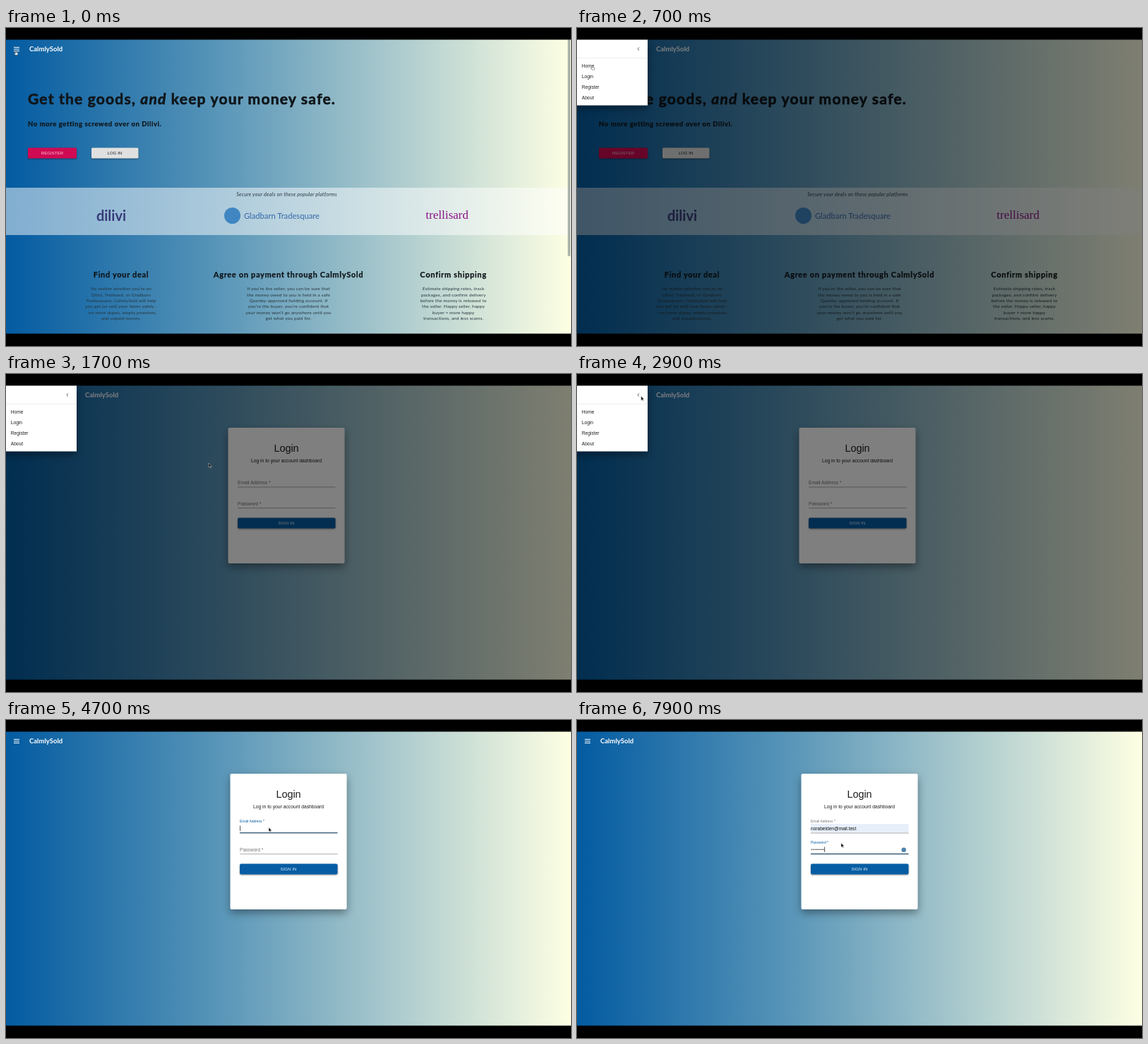
Recreate the animation shown at these times as an HTML page. Size 800 px wide and 450 px high, loop 8000 ms.

```html
<!DOCTYPE html>
<html lang="en">
<head>
<meta charset="utf-8">
<title>Sign-in walkthrough</title>
<style>
  html, body { margin: 0; width: 100%; height: 100%; overflow: hidden; background: #000; }
  svg { display: block; width: 800px; height: 450px; font-family: "Liberation Sans", Arial, sans-serif; }
  .geo { font-family: Lato, sans-serif; }
  .mid { text-anchor: middle; }
  .h1, .h2, .h3 { font-weight: 700; stroke: #10161a; stroke-width: .25px; }
  .h1 { font-size: 21px; letter-spacing: 1.2px; stroke-width: .6px; }
  .h2 { font-size: 9.5px; letter-spacing: .58px; }
  .h3 { font-size: 11px; letter-spacing: .68px; }
  .para { font-size: 6.45px; letter-spacing: .17px; fill: #26353c; }
  .btn { font-size: 6px; letter-spacing: .1px; }
  .field { font-size: 6.6px; }
  .lift { filter: drop-shadow(0 1px 1px rgba(0,0,0,.4)); }
  .card { filter: drop-shadow(0 5px 6px rgba(0,0,0,.38)); }
  .panel { filter: drop-shadow(0 4px 6px rgba(0,0,0,.4)); }
</style>
</head>
<body>
<svg viewBox="0 0 800 450">
  <defs>
    <linearGradient id="sky">
      <stop offset="0" stop-color="#035ba1"/>
      <stop offset=".375" stop-color="#5895b8"/>
      <stop offset="1" stop-color="#feffe3"/>
    </linearGradient>
  </defs>
  <rect y="16" width="800" height="417" fill="url(#sky)"/>

  <g id="landing" fill="#10161a">
    <text class="geo h1" x="31" y="108">Get the goods, <tspan font-style="italic">and</tspan> keep your money safe.</text>
    <text class="geo h2" x="31" y="139">No more getting screwed over on Dilivi.</text>
    <g class="lift">
      <rect x="31" y="169.5" width="69" height="15" rx="1.5" fill="#cf0a52"/>
      <rect x="121" y="169.5" width="66.5" height="15" rx="1.5" fill="#e0e0e0"/>
    </g>
    <text class="btn mid" x="65.5" y="179.2" fill="#f6cfdd">REGISTER</text>
    <text class="btn mid" x="154" y="179.2">LOG IN</text>

    <rect y="226" width="800" height="67" fill="#fff" opacity=".5"/>
    <text class="geo mid" x="397.5" y="237.8" font-size="7.1" font-style="italic" letter-spacing=".25" fill="#2c3a42">Secure your deals on these popular platforms</text>
    <text class="geo mid" x="149" y="272.5" font-size="20" font-weight="700" fill="#373a78">dilivi</text>
    <circle cx="320.5" cy="265.5" r="11.5" fill="#3f86c2"/>
    <text class="geo" x="337" y="270" font-size="11.2" fill="#3468a8">Gladbarn Tradesquare</text>
    <text class="mid" x="624.5" y="270" font-size="17" font-family="Liberation Serif, Times, serif" fill="#8a1484">trellisard</text>
    <g id="columns"></g>
  </g>
  <rect id="scrollbar" x="795.5" y="16" width="3.5" height="307" rx="1.7" fill="#8d9695" opacity=".75"/>

  <g id="login">
    <rect class="card" x="317.5" y="76" width="165" height="192" rx="2" fill="#fff"/>
    <text class="mid" x="400" y="109.5" font-size="14.4" fill="#1c1c1c">Login</text>
    <text class="mid" x="400" y="125.3" font-size="6.75" fill="#1c1c1c">Log in to your account dashboard</text>
    <rect id="fill" x="331" y="147" width="138.5" height="12.5" fill="#e7effb"/>
    <text id="emailLabel" class="field">Email Address *</text>
    <text id="email" class="field" x="331" y="155.6" fill="#111">norabelden@mail.test</text>
    <rect id="emailLine" x="331" width="138.5"/>
    <text id="passLabel" class="field">Password *</text>
    <g id="dots" fill="#111"></g>
    <rect id="caret" width=".7" height="7.5" fill="#111"/>
    <circle id="badge" cx="462.7" cy="183.8" r="3.2" fill="#4d83ad"/>
    <rect id="passLine" x="331" width="138.5"/>
    <rect class="lift" x="331" y="203.5" width="138.5" height="15" rx="2" fill="#075da3"/>
    <text class="btn mid" x="400" y="213.2" fill="#e4eef6">SIGN IN</text>
  </g>

  <g id="header" fill="#fff">
    <path d="M11 27.4h8M11 30h8M11 32.6h8" stroke="#fff" stroke-width="1"/>
    <text class="geo" x="33" y="33.2" font-size="9.5" font-weight="700">CalmlySold</text>
  </g>

  <rect id="shade" y="16" width="800" height="417"/>

  <g id="drawer">
    <rect class="panel" x="-10" y="16" width="110" height="93.5" fill="#fff"/>
    <path d="M88 27.4l-2.1 2.1 2.1 2.1" fill="none" stroke="#444" stroke-width=".9"/>
    <rect y="42.5" width="100" height=".6" fill="#e2e2e2"/>
    <g id="items" font-size="6.7" fill="#222"></g>
  </g>

  <path id="arrow" d="M0 0v6.2l1.5-1.3 1 2.2 .9-.4-1-2.1h2z" fill="#111" stroke="#fff" stroke-width=".4"/>
  <path id="hand" d="M-.7 0Q0-.8 .7 0V2.6L2.4 3Q3 3.3 2.9 4.2L2.4 6.2H-.8L-2.4 4Q-2.2 3.2-.7 4.2Z" fill="#fff" stroke="#333" stroke-width=".45"/>

  <path d="M0 0h800v16.4H0zM0 432.5h800v17.5H0z"/>
</svg>
<script>
  const $ = id => document.getElementById(id);

  function add(parent, tag, attrs, content = "") {
    const el = document.createElementNS("http://www.w3.org/2000/svg", tag);
    set(el, attrs);
    el.textContent = content;
    $(parent).append(el);
    return el;
  }
  function set(el, attrs) {
    for (const key in attrs) el.setAttribute(key, attrs[key]);
  }
  const show = (id, on) => { $(id).style.display = on ? "" : "none"; };
  const shift = (id, x, y) => set($(id), { transform: `translate(${x} ${y})` });

  const columns = [
    [163, "Find your deal", "No matter whether you’re on|Dilivi, Trellisard, or Gladbarn|Tradesquare, CalmlySold will help|you get (or sell) your items safely -|- no more dupes, empty promises,|and unpaid money."],
    [400, "Agree on payment through CalmlySold", "If you’re the seller, you can be sure that|the money owed to you is held in a safe|Quenby-approved holding account. If|you’re the buyer, you’re confident that|your money won’t go anywhere until you|get what you paid for."],
    [633.5, "Confirm shipping", "Estimate shipping rates, track|packages, and confirm delivery|before the money is released to|the seller. Happy seller, happy|buyer = more happy|transactions, and less scams."]
  ];
  for (const [x, title, body] of columns) {
    add("columns", "text", { class: "geo h3 mid", x, y: 353 }, title);
    body.split("|").forEach((line, i) =>
      add("columns", "text", { class: "geo para mid", x, y: 371.4 + i * 8.3 }, line));
  }
  ["Home", "Login", "Register", "About"].forEach((name, i) =>
    add("items", "text", { x: 6.7, y: 56.2 + i * 15 }, name));
  const dots = Array.from({ length: 8 }, (_, i) =>
    add("dots", "circle", { cx: 332.3 + i * 2.4, cy: 183.3, r: .75 }));

  const LOOP = 8000, NAVIGATE = 1100, CLOSE = 3226, EMAIL = 4300, FILLED = 4900, PASSWORD = 5600;
  const clamp = v => Math.max(0, Math.min(1, v));
  const smooth = u => u * u * (3 - 2 * u);
  const phase = (t, start, length) => clamp((t - start) / length);

  // cubic-bezier(0, 0, .2, 1)
  function easeOut(u) {
    let lo = 0, hi = 1;
    for (let i = 0; i < 20; i++) {
      const s = (lo + hi) / 2;
      if (.6 * s * s + .4 * s ** 3 < u) lo = s; else hi = s;
    }
    return smooth(lo);
  }

  // time, x, y
  const route = [
    [0, 14, 32], [350, 14, 32], [650, 22, 53], [700, 22, 53], [950, 17, 68], [1150, 17, 68],
    [1600, 287, 126], [2400, 287, 126], [2950, 86, 29], [3450, 86, 29],
    [4150, 372, 152], [5000, 372, 152], [5500, 374, 174], [LOOP, 374, 174]
  ];
  function cursorAt(t) {
    const i = route.findIndex(p => p[0] > t);
    const [t0, x0, y0] = route[i - 1], [t1, x1, y1] = route[i];
    const u = smooth(phase(t, t0, t1 - t0));
    return [x0 + (x1 - x0) * u, y0 + (y1 - y0) * u];
  }

  function label(id, y, raised, focused) {
    set($(id), {
      transform: `translate(331 ${raised ? y - 11 : y}) scale(${raised ? .75 : 1})`,
      fill: focused ? "#075da3" : "#757575"
    });
  }
  function underline(id, y, focused) {
    set($(id), { y: y - (focused ? .5 : 0), height: focused ? 1.1 : .6, fill: focused ? "#0b3558" : "#777" });
  }

  function draw(t) {
    const closing = smooth(phase(t, CLOSE, 200));
    const open = easeOut(phase(t, 150, 225)) - closing;
    const push = easeOut(phase(t, 150, 280)) - smooth(phase(t, 3293, 195));
    const modal = t > 150 && t < CLOSE;

    show("landing", t < NAVIGATE);
    show("scrollbar", t < 150);
    show("login", t >= NAVIGATE);
    shift("login", modal ? -3 : 0, 0);
    shift("header", 79 * push, 0);
    $("shade").style.opacity = .5 * open;
    show("drawer", open > .001);
    shift("drawer", 0, -93.5 * (1 - open));

    const onEmail = t >= EMAIL && t < PASSWORD, onPass = t >= PASSWORD;
    label("emailLabel", 155.5, t >= EMAIL, onEmail);
    label("passLabel", 185.5, t >= FILLED, onPass);
    underline("emailLine", 159.7, onEmail);
    underline("passLine", 189.5, onPass);
    show("fill", t >= FILLED);
    show("email", t >= FILLED);
    show("badge", onPass);

    const typed = Math.round(8 * phase(t, 6700, 1000));
    dots.forEach((dot, i) => { dot.style.display = i < typed ? "" : "none"; });
    const emptyEmail = onEmail && t < FILLED;
    show("caret", emptyEmail || typed > 0);
    set($("caret"), emptyEmail ? { x: 331, y: 149.5 } : { x: 331 + typed * 2.42, y: 179.5 });

    const [x, y] = cursorAt(t);
    const pointing = t < 1200 || (t > 2900 && t < 3500);
    show("hand", pointing);
    show("arrow", !pointing);
    shift(pointing ? "hand" : "arrow", x, y);
  }

  const begin = performance.now();
  function tick() {
    const t = (performance.now() - begin) % LOOP;
    draw(Math.floor(t / 100) * 100);
    requestAnimationFrame(tick);
  }
  tick();
</script>
</body>
</html>
```
